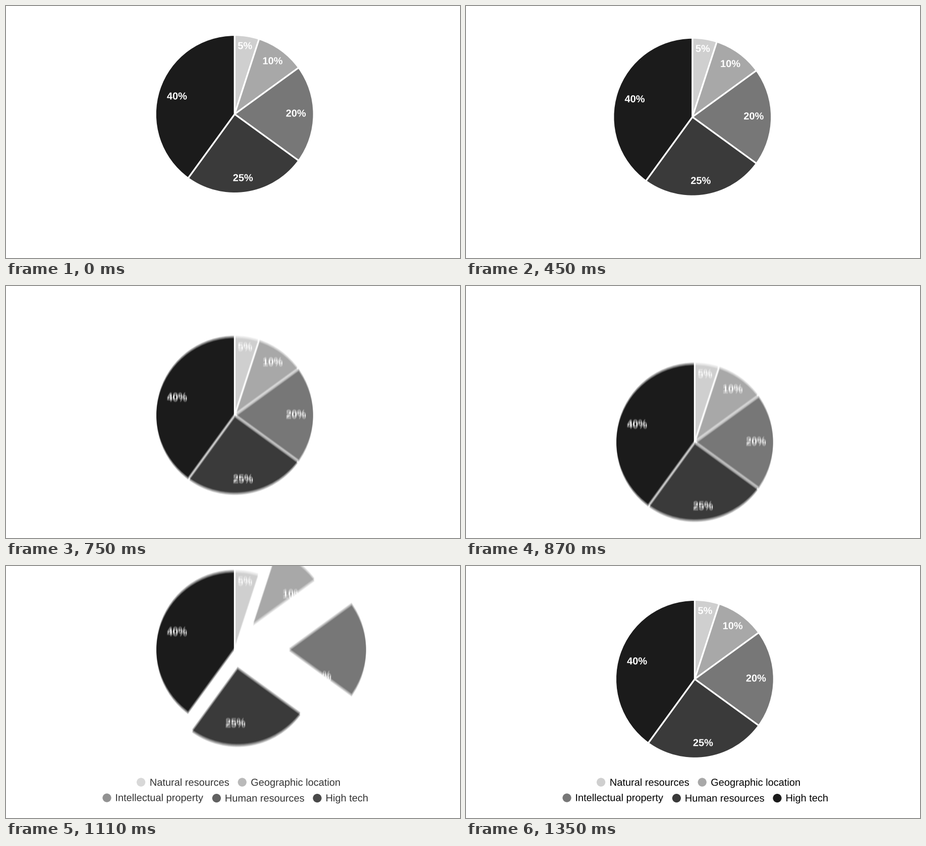
These frames come from a looping animation (900 px wide and 500 px high, 5.4 s). A matplotlib script:

```python
import math

import numpy as np
import matplotlib.pyplot as plt
from matplotlib.animation import FuncAnimation
from matplotlib.patches import Circle, PathPatch, Wedge
from matplotlib.textpath import TextPath
from matplotlib.transforms import Affine2D

W, H, DPI = 900, 500, 100
STEP, LOOP, SETTLED = 30, 5400, 1350
CX, CY, RADIUS, GAP = 453.4, 224.4, 157, 3.2
SHUTTER, SAMPLES = 15, 8

# share %, fill, label centre, burst distance, burst time
SLICES = [
    (5, "#cfcfcf", (20.6, -136), 100, 1050),
    (10, "#a8a8a8", (75.6, -106), 114, 1080),
    (20, "#777777", (121.6, -2), 105, 1110),
    (25, "#3a3a3a", (16.6, 126), 70, 1140),
    (40, "#1b1b1b", (-114.4, -36), 87, 1170),
]
# text, dot centre, text origin
LEGEND = [
    ("Natural resources", (267.6, 429), (284.8, 436)),
    ("Geographic location", (468.2, 429), (485.2, 436)),
    ("Intellectual property", (200, 460), (216.4, 466.4)),
    ("Human resources", (417.4, 460.6), (433.8, 467.4)),
    ("High tech", (617, 460.6), (633.6, 467)),
]
SHAKE_X = [(0, 453.2), (120, 460.5), (240, 450.6), (345, 446.5), (450, 448.8), (570, CX)]
SHAKE_Y = [(0, 214.6), (120, 219), (240, 222.6), (345, 225.5), (450, 220.2), (570, CY)]


def ease(u):
    return 0.5 - 0.5 * math.cos(math.pi * min(max(u, 0), 1))


def glide(t, keys):
    """Eased path through (time, value) keys, at rest on every key."""
    for (t0, v0), (t1, v1) in zip(keys, keys[1:]):
        if t <= t1:
            return v0 + (v1 - v0) * ease((t - t0) / (t1 - t0))
    return keys[-1][1]


def settle(t):
    return CY - 58.4 * (max(SETTLED - t, 0) / 240) ** 2


def height(t):
    if t < 600:
        return glide(t, SHAKE_Y)
    if t < 750:
        return CY + 32 * ((t - 600) / 150) ** 2
    if t < 945:
        return 256.4 + 0.4467 * (t - 750)
    if t < 1095:
        return glide(t, [(945, 343.5), (1095, settle(1095))])
    return settle(t)


def spin(t):
    if not 0 < t < 450:
        return 0
    return 8.5 * math.sin(math.pi * t / 450) ** 2 * math.sin(2 * math.pi * t / 60)


def burst(t, peak, when):
    return peak * max(0, 1 - abs(t - when) / 60)


def polar(distance, bearing):
    """Offset for a clockwise bearing measured from straight up."""
    a = math.radians(bearing)
    return distance * math.sin(a), -distance * math.cos(a)


fig = plt.figure(figsize=(W / DPI, H / DPI), dpi=DPI, facecolor="white")
ax = fig.add_axes([0, 0, 1, 1])
ax.set_xlim(0, W)
ax.set_ylim(H, 0)
ax.axis("off")


def text_patch(text, xy, color, weight="normal", centred=False):
    path = TextPath((0, 0), text, size=20,
                    prop={"family": "Liberation Sans", "weight": weight})
    shift = Affine2D()
    if centred:
        box = path.get_extents()
        shift.translate(-(box.x0 + box.x1) / 2, -(box.y0 + box.y1) / 2)
    path = path.transformed(shift.scale(1, -1).translate(*xy))
    return ax.add_patch(PathPatch(path, facecolor=color, linewidth=0, zorder=3))


parts, legend = [], []
start = 0
for share, color, label_at, peak, when in SLICES:
    sweep = share * 3.6
    wedge = ax.add_patch(Wedge((0, 0), RADIUS, start - 90, start + sweep - 90,
                               facecolor=color, edgecolor="white",
                               linewidth=GAP * 72 / DPI, joinstyle="round"))
    label = text_patch(f"{share}%", label_at, "white", "bold", True)
    parts.append((wedge, label, start + sweep / 2, peak, when))
    start += sweep

for (text, dot, origin), (_, color, *_) in zip(LEGEND, SLICES):
    legend.append(ax.add_patch(Circle(dot, 8.6, facecolor=color, linewidth=0)))
    legend.append(text_patch(text, origin, "black"))


def place(patch, offset, angle, x, y):
    move = Affine2D().translate(*offset).rotate_deg(angle).translate(x, y)
    patch.set_transform(move + ax.transData)


def snapshot(t, pose):
    for wedge, label, bearing, peak, when in parts:
        reach = burst(t, peak, when)
        place(wedge, polar(reach, bearing), *pose)
        place(label, polar(0.7 * reach, bearing + 47), *pose)
    fig.canvas.draw()
    return np.asarray(fig.canvas.buffer_rgba())[..., :3].astype(float)


def exposure(t):
    """Average several poses over the open shutter for motion blur."""
    for patch in legend:
        patch.set_alpha(min(max((t - 990) / 150, 0), 1))
    if t >= SETTLED:
        poses = [(0, CX, CY)]
    else:
        times = t + SHUTTER * (np.arange(SAMPLES) / (SAMPLES - 1) - 0.5)
        poses = [(spin(s), glide(max(s, 0), SHAKE_X), height(max(s, 0))) for s in times]
    return np.rint(sum(snapshot(t, p) for p in poses) / len(poses)).astype(np.uint8)


shots = [exposure(t) for t in range(0, SETTLED + 1, STEP)]

for patch in list(ax.patches):
    patch.remove()
screen = ax.imshow(shots[0], extent=(0, W, H, 0), aspect="auto", interpolation="nearest")


def update(i):
    screen.set_data(shots[min(i, len(shots) - 1)])
    return [screen]


anim = FuncAnimation(fig, update, frames=LOOP // STEP, interval=STEP,
                     repeat=True, repeat_delay=0, blit=False)
plt.show()
```
